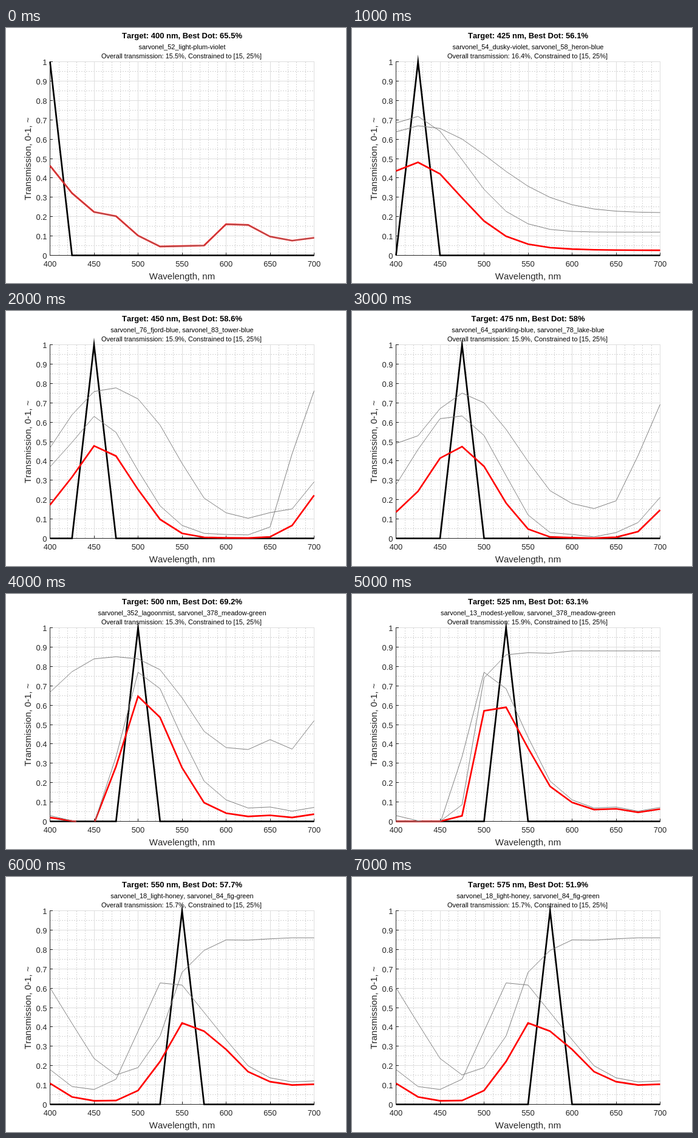
Write an HTML page that moves like this. It is 560 px wide and 420 px high and loops after 8000 ms.

```html
<!DOCTYPE html>
<html lang="en">
<head>
<meta charset="utf-8">
<title>Filter transmission</title>
<style>
html, body { margin: 0; width: 100%; height: 100%; overflow: hidden; background: #fff; }
svg { display: block; width: 560px; height: 420px; }
text { font-family: "Liberation Sans", Arial, sans-serif; font-kerning: none; text-anchor: middle; }
.tick { font-size: 13px; fill: #262626; }
.label { font-size: 15px; fill: #262626; }
.sub { font-size: 11px; }
#title { font-size: 13px; font-weight: bold; }
path { fill: none; stroke-miterlimit: 20; }
</style>
</head>
<body>
<svg viewBox="0 0 560 420">
  <path id="minor" stroke="#d4d4d4" stroke-dasharray="2 2" shape-rendering="crispEdges"/>
  <path id="major" stroke="#dedede" shape-rendering="crispEdges"/>
  <path id="axes" stroke="#262626" shape-rendering="crispEdges"/>
  <g id="ticks"></g>
  <text class="label" x="290" y="414">Wavelength, nm</text>
  <text class="label" transform="translate(41 215.5) rotate(-90)">Transmission, 0-1, ~</text>
  <text id="title" x="290" y="17"></text>
  <text id="filters" class="sub" x="290" y="35"></text>
  <text id="overall" class="sub" x="289" y="50"></text>
  <path id="peak" stroke="#000" stroke-width="2.67"/>
  <path id="mix" stroke="#f00" stroke-width="2.67"/>
  <path id="parts" stroke="#808080" stroke-width="1"/>
</svg>
<script>
const $ = id => document.getElementById(id);
const STEP = 1000, N = 13;
const nm = i => 400 + 25 * i;
const px = w => 72.5 + (w - 400) * 1.45;
const py = v => 374.5 - v * 319;
const grid = Array.from({ length: N }, (_, i) => i);

// Curves sampled every 25 nm; a short list holds its last value.
const curve = (...v) => grid.map(i => v[Math.min(i, v.length - 1)]);
const bell = (mid, width, height, base) =>
  grid.map(i => base + height * Math.exp(-(((nm(i) - mid) / width) ** 2)));

const filters = {
  "52_light-plum-violet": curve(.463, .321, .224, .202, .102, .046, .048, .051, .161, .157, .097, .076, .091),
  "54_dusky-violet": bell(420, 80, .6, .12),
  "58_heron-blue": bell(430, 110, .45, .22),
  "76_fjord-blue": curve(.468, .638, .758, .777, .72, .585, .387, .208, .132, .104, .133, .152, .292),
  "83_tower-blue": curve(.369, .496, .63, .547, .35, .168, .067, .026, .02, .018, .059, .437, .762),
  "64_sparkling-blue": curve(.49, .53, .67, .75, .7, .563, .397, .246, .18, .154, .194, .428, .692),
  "78_lake-blue": curve(.277, .459, .618, .632, .531, .324, .121, .03, .02, .008, .03, .082, .212),
  "352_lagoonmist": curve(.667, .773, .839, .85, .839, .783, .638, .465, .381, .371, .422, .373, .52),
  "378_meadow-green": curve(.03, .003, -.012, .334, .77, .685, .434, .208, .111, .069, .074, .053, .072),
  "13_modest-yellow": curve(0, 0, 0, .086, .741, .86, .871, .868, .88),
  "18_light-honey": curve(.602, .418, .237, .152, .19, .353, .682, .795, .849, .848, .855, .86),
  "84_fig-green": curve(.18, .092, .077, .13, .378, .627, .616, .475, .334, .199, .137, .116, .121)
};

// Best dot, overall transmission, filters used.
const scenes = [
  ["65.5", "15.5", "52_light-plum-violet"],
  ["56.1", "16.4", "54_dusky-violet", "58_heron-blue"],
  ["58.6", "15.9", "76_fjord-blue", "83_tower-blue"],
  ["58", "15.9", "64_sparkling-blue", "78_lake-blue"],
  ["69.2", "15.3", "352_lagoonmist", "378_meadow-green"],
  ["63.1", "15.9", "13_modest-yellow", "378_meadow-green"],
  ["57.7", "15.7", "18_light-honey", "84_fig-green"],
  ["51.9", "15.7", "18_light-honey", "84_fig-green"]
];

// Polyline cut off where it goes below zero.
function trace(vals) {
  let d = "", pen = false;
  const add = (i, v) => {
    d += `${pen ? "L" : "M"}${px(nm(i)).toFixed(2)} ${py(v).toFixed(2)}`;
    pen = true;
  };
  vals.forEach((v, i) => {
    const last = i ? vals[i - 1] : v;
    if ((last < 0) !== (v < 0)) add(i - 1 + last / (last - v), 0);
    if (v < 0) pen = false;
    else add(i, v);
  });
  return d;
}

function drawAxes() {
  const paths = { minor: "", major: "", axes: "M72.5 55V374.5H508" };
  let labels = "";
  const snap = n => Math.floor(n) + .5;
  for (let w = 400; w <= 700; w += 10) {
    const x = snap(px(w)), main = w % 50 === 0;
    paths[main ? "major" : "minor"] += `M${x} 374V55`;
    if (!main) continue;
    paths.axes += `M${x} 374V370`;
    labels += `<text class="tick" x="${px(w)}" y="393">${w}</text>`;
  }
  for (let k = 0; k <= 20; k++) {
    const y = snap(py(k / 20)), main = k % 2 === 0;
    paths[main ? "major" : "minor"] += `M72 ${y}H508`;
    if (!main) continue;
    paths.axes += `M73 ${y}H77`;
    labels += `<text class="tick" x="67.5" y="${y + 5}" style="text-anchor:end">${k / 20}</text>`;
  }
  for (const id in paths) $(id).setAttribute("d", paths[id]);
  $("ticks").innerHTML = labels;
}

function show(n) {
  const [dot, total, ...names] = scenes[n];
  const parts = names.map(k => filters[k]);
  $("title").textContent = `Target: ${nm(n)} nm, Best Dot: ${dot}%`;
  $("filters").textContent = names.map(k => "sarvonel_" + k).join(", ");
  $("overall").textContent = `Overall transmission: ${total}%, Constrained to [15, 25%]`;
  $("peak").setAttribute("d", trace(grid.map(i => i === n ? 1 : 0)));
  $("mix").setAttribute("d", trace(grid.map(i => parts.reduce((p, c) => p * c[i], 1))));
  $("parts").setAttribute("d", parts.map(trace).join(""));
}

let shown = -1;
function tick(now) {
  const n = Math.floor(now / STEP) % scenes.length;
  if (n !== shown) show(shown = n);
  requestAnimationFrame(tick);
}

drawAxes();
show(0);
requestAnimationFrame(tick);
</script>
</body>
</html>
```
